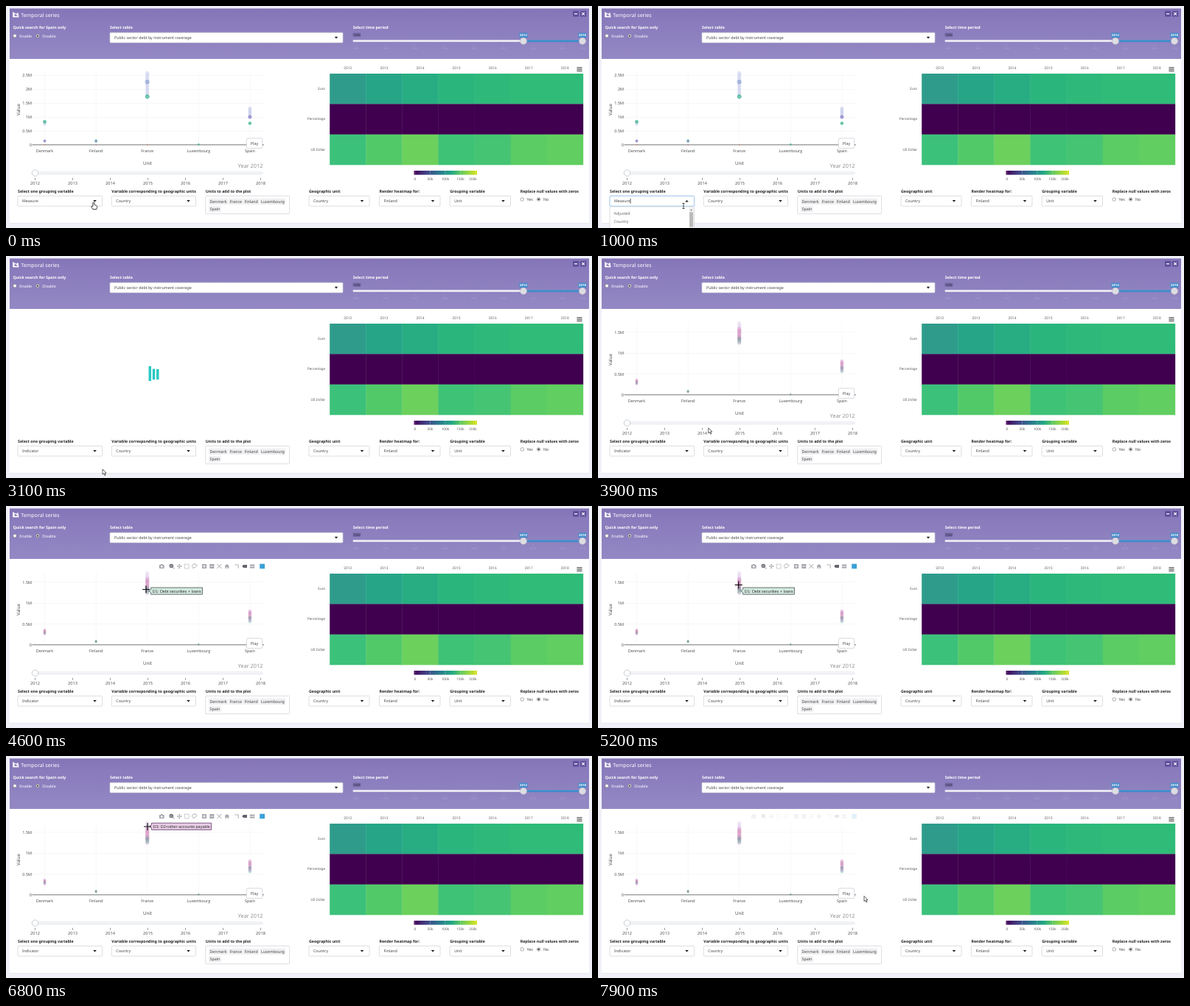
Write an HTML page with a canvas that moves like this. It is 795x302 px and loops after 8000 ms.

```html
<!DOCTYPE html>
<html lang="en">
<head>
<meta charset="utf-8">
<title>Temporal series</title>
<style>
  html, body { margin: 0; width: 100%; height: 100%; overflow: hidden; background: #f0f0f8; }
  canvas { display: block; }
</style>
</head>
<body>
<canvas id="stage" width="795" height="302"></canvas>
<script>
const ctx = document.getElementById('stage').getContext('2d');
const LOOP = 8000;
const UI = '"Noto Sans", sans-serif';
const PLOT = '"Open Sans", sans-serif';
const HEAT = 'Roboto, sans-serif';
const years = [2012, 2013, 2014, 2015, 2016, 2017, 2018];
const countries = ['Denmark', 'Finland', 'France', 'Luxembourg', 'Spain'];
const countryX = i => 52.5 + i * 69.6;

// y is the middle of the capitals
function text(s, x, y, { size = 5.3, color = '#444', font = UI, bold = false, align = 'left' } = {}) {
  ctx.font = `${bold ? 'bold ' : ''}${size}px ${font}`;
  ctx.textAlign = align;
  ctx.fillStyle = color;
  ctx.fillText(s, x, y + size * 0.36);
}
function rect(x, y, w, h, color) {
  ctx.fillStyle = color;
  ctx.fillRect(x, y, w, h);
}
function box(x, y, w, h, fill, stroke, r = 1, width = 0.7) {
  ctx.beginPath();
  ctx.roundRect(x, y, w, h, r);
  if (fill) { ctx.fillStyle = fill; ctx.fill(); }
  if (stroke) { ctx.strokeStyle = stroke; ctx.lineWidth = width; ctx.stroke(); }
}
function circle(x, y, r, fill, stroke, width = 0.7) {
  ctx.beginPath();
  ctx.arc(x, y, r, 0, 7);
  if (fill) { ctx.fillStyle = fill; ctx.fill(); }
  if (stroke) { ctx.strokeStyle = stroke; ctx.lineWidth = width; ctx.stroke(); }
}
function path(d, x, y, fill, stroke, width = 0.7) {
  const p = new Path2D(d);
  ctx.save();
  ctx.translate(x, y);
  if (fill) { ctx.fillStyle = fill; ctx.fill(p); }
  if (stroke) { ctx.strokeStyle = stroke; ctx.lineWidth = width; ctx.stroke(p); }
  ctx.restore();
}
const caret = (x, y, up) => path(up ? 'M-2.3 1.2H2.3L0-1.4Z' : 'M-2.3-1.2H2.3L0 1.4Z', x, y, '#222');

function select(x, w, label, value) {
  text(label, x, 252, { bold: true, color: '#222' });
  box(x, 258.4, w, 13.8, '#fff', '#ccd0d6');
  text(value, x + 6, 265.4);
  caret(x + w - 10, 265.3);
}
function radio(x, y, label, on, color) {
  circle(x, y, 2.3, '#fff', '#777', 0.6);
  if (on) circle(x, y, 1.2, '#333');
  text(label, x + 6.3, y, { color });
}

function drawHeader() {
  const g = ctx.createLinearGradient(0, 3, 0, 72);
  g.addColorStop(0, '#8474b7');
  g.addColorStop(0.25, '#897bbc');
  g.addColorStop(1, '#9488c4');
  rect(5, 3.4, 786, 68.6, g);
  path('M0 0V7H8M1.5 6V3.8L3.3 1.8 4.8 3.2 6.4 1.2 7.4 6Z', 9.6, 8, '#fff', '#fff', 0.7);
  text('Temporal series', 20.3, 12, { size: 7.05, color: '#fff' });
  for (const x of [769, 779]) box(x, 6.8, 8.2, 7.6, '#5e4f9b', null);
  rect(771, 10.1, 4.2, 1.2, '#fff');
  path('M-1.8-1.8 1.8 1.8M1.8-1.8-1.8 1.8', 783.1, 10.6, null, '#fff', 1.1);

  const title = { bold: true, color: '#fff' };
  text('Quick search for Spain only', 9.4, 29.5, title);
  radio(12, 40.6, 'Enable', false, '#fff');
  radio(43, 40.6, 'Disable', true, '#fff');
  text('Select table', 141, 29.5, title);
  box(141, 36.2, 316, 13.7, '#fff', '#ccd0d6');
  text('Public sector debt by instrument coverage', 147, 43.2);
  caret(448, 43);

  text('Select time period', 470.7, 29.5, title);
  box(470.6, 46.1, 316, 3, '#e6e4f0', null);
  rect(702, 46.1, 80, 3, '#428bca');
  box(470.6, 36.4, 10.6, 5.4, '#7166a0', null);
  text('1995', 475.9, 39.2, { size: 4.2, color: '#3f3a58', align: 'center' });
  for (const [x, year] of [[702, 2012], [782, 2018]]) {
    circle(x, 47.7, 4.6, '#dddde2', '#b5b3c2', 0.6);
    box(x - 5.6, 36.4, 11.2, 6.6, '#428bca', null);
    text(year, x, 39.8, { size: 4.3, color: '#fff', align: 'center', bold: true });
  }
  for (let i = 0; i < 9; i++) {
    const x = Math.min(474.5 + i * 40.1, 782);
    rect(x, 52, 0.5, 2.5, '#a79fcd');
    text(Math.min(1995 + 3 * i, 2018), x, 57.5, { size: 3.7, color: '#a9a1cf', align: 'center' });
  }
}

function drawHeatmap() {
  const rows = [
    ['Euro', ['#2f9c8b', '#26a587', '#27ad81', '#2ab57d', '#2eb97a', '#30bb78', '#30bb78']],
    ['Percentage', Array(7).fill('#40004f')],
    ['US Dollar', ['#3cc17b', '#52c969', '#6cd05c', '#3ec376', '#45c473', '#5bcc64', '#60ce60']]
  ];
  const w = 343.6 / 7, h = 124 / 3;
  rows.forEach(([name, colors], r) => {
    colors.forEach((c, i) => rect(439.2 + i * w, 92 + r * h, w + 0.4, h + 0.3, c));
    text(name, 433, 112.4 + r * h, { size: 4.8, font: HEAT, color: '#666', align: 'right' });
  });
  years.forEach((y, i) => text(y, 463.8 + i * w, 84.3, { size: 4.9, font: HEAT, color: '#666', align: 'center' }));
  for (let i = 0; i < 3; i++) rect(774.4, 83.2 + i * 2.3, 7.2, 1.2, '#555');

  const g = ctx.createLinearGradient(553.5, 0, 639, 0);
  ['#440154', '#414487', '#2a788e', '#22a884', '#7ad151', '#d8e219'].forEach((c, i) => g.addColorStop(i / 5, c));
  rect(553.5, 224, 85.5, 5.6, g);
  ['0', '50k', '100k', '150k', '200k'].forEach((s, i) => {
    const x = 554.2 + i * 20.5;
    rect(x + 0.5, 224, 0.5, 5.6, '#ffffff70');
    text(s, Math.min(x + 0.7, 633.5), 235.7, { size: 4.8, font: HEAT, color: '#666', align: 'center' });
  });
}

function drawControls(open, chosen) {
  select(16, 114.5, 'Select one grouping variable', chosen);
  select(143.3, 114.2, 'Variable corresponding to geographic units', 'Country');
  text('Units to add to the plot', 270.8, 252, { bold: true, color: '#222' });
  box(270.8, 258.4, 113.8, 24.4, '#fff', '#ccd0d6');
  [[276.5, 266], [303.5, 266], [323.5, 266], [346, 266], [276.5, 276.4]].forEach(([x, y], i) => {
    const name = ['Denmark', 'France', 'Finland', 'Luxembourg', 'Spain'][i];
    ctx.font = `5.3px ${UI}`;
    box(x - 1.5, y - 4.2, ctx.measureText(name).width + 3, 8.4, '#efeff1', null);
    text(name, x, y);
  });
  select(411, 82, 'Geographic unit', 'Country');
  select(506.4, 82.6, 'Render heatmap for:', 'Finland');
  select(602.2, 82.3, 'Grouping variable', 'Unit');
  text('Replace null values with zeros', 697.7, 252, { bold: true, color: '#222' });
  radio(700.2, 263, 'Yes', false);
  radio(722.6, 263, 'No', true);

  if (!open) return;
  box(16, 258.4, 114.5, 13.8, '#fff', '#7fb6ea');
  text('Measure', 22, 265.4);
  rect(43.7, 261.8, 0.7, 7, '#222');
  caret(120.5, 265.3, true);
  box(16, 273, 114.5, 40, '#fff', '#ccd0d6');
  ['Adjusted', 'Country', 'Frequency'].forEach((s, i) => text(s, 21.6, 282 + i * 11, { color: '#666' }));
  rect(123.6, 273.6, 6, 30, '#f0f0f0');
  path('M-1.4 1H1.4L0-.8Z', 126.6, 277.3, '#666');
  rect(124.2, 280.5, 4.9, 20, '#b9b9b9');
}

// A stack of translucent markers between two heights
function stack(x, top, bottom, n, r, colors) {
  for (let i = 0; i < n; i++) {
    const y = n > 1 ? top + (bottom - top) * i / (n - 1) : top;
    const c = colors[i % colors.length];
    circle(x, y, r, c + '48', c + '80', 0.5);
  }
}
function drawMeasurePoints() {
  const pale = ['#b5b4e2', '#a9c4ea', '#c5bfe6'];
  const [dk, fi, fr, lu, es] = countries.map((_, i) => countryX(i));
  const teal = '#2fae8a', violet = '#7b74c4';
  stack(fr, 91.5, 100, 4, 2.4, pale);
  stack(fr, 106, 120, 7, 2.2, pale);
  stack(fr, 103.2, 103.2, 2, 2.5, [violet, '#5b8cc9']);
  stack(fr, 123.2, 123.2, 3, 2.5, [teal]);
  stack(es, 139, 149, 7, 2, pale);
  stack(es, 151, 151, 3, 2.1, [violet]);
  stack(es, 159.6, 159.6, 3, 1.8, [teal]);
  stack(dk, 159, 161, 2, 1.8, pale);
  stack(dk, 157.4, 157.4, 3, 1.9, [teal]);
  stack(dk, 183.6, 183.6, 3, 1.5, [violet]);
  stack(fi, 183, 184.4, 4, 1.4, [teal, violet]);
  stack(lu, 188.3, 188.3, 2, 1.1, [teal]);
  for (const x of [dk, fi, fr, es]) circle(x, 188.7, 0.8, '#d8795f');
}
function drawIndicatorPoints() {
  const mix = ['#c77fd0', '#e08ab8', '#b26fb5', '#d87fa0'];
  const low = ['#55a895', '#8d7f9c'];
  const [dk, fi, fr, lu, es] = countries.map((_, i) => countryX(i));
  stack(fr, 91.5, 97, 3, 2.4, ['#dcc3e8']);
  stack(fr, 99, 113, 9, 2.4, mix);
  stack(fr, 112, 118, 4, 2.3, low);
  stack(es, 143, 152, 7, 2, mix);
  stack(es, 152, 157, 4, 1.9, low.concat(mix[0]));
  stack(dk, 168.5, 174, 7, 1.5, mix.concat(low));
  stack(fi, 183.5, 185, 4, 1.2, low);
  stack(lu, 188.3, 188.3, 2, 1, low);
}

function drawPlot(indicator) {
  const step = indicator ? 28.4 : 18.9;
  const ticks = indicator ? 3 : 5;
  for (let i = 0; i <= ticks; i++) {
    const y = 189 - i * step;
    if (i) rect(36, y - 0.2, 312, 0.5, '#eeeeee');
    text(i ? i / 2 + 'M' : '0', 35, y, { size: 5.5, font: PLOT, align: 'right' });
  }
  countries.forEach((name, i) => {
    rect(countryX(i) - 0.2, 90, 0.5, 98, '#f1f1f1');
    text(name, countryX(i), 197.3, { size: 5.4, font: PLOT, align: 'center' });
  });
  rect(35.5, 188.4, 314.5, 0.9, '#666');
  indicator ? drawIndicatorPoints() : drawMeasurePoints();

  ctx.save();
  ctx.translate(17, 141);
  ctx.rotate(-Math.PI / 2);
  text('Value', 0, 0, { size: 6.2, font: PLOT, align: 'center' });
  ctx.restore();
  text('Unit', 192, 213.7, { size: 6.2, font: PLOT, align: 'center' });
  text('Year 2012', 348.3, 217, { size: 7.3, font: PLOT, color: '#888', align: 'right' });

  box(326.3, 180, 21.4, 13.6, '#fff', '#c3c8d0', 1.8);
  text('Play', 337, 186.6, { size: 5.5, font: PLOT, align: 'center' });

  box(35.5, 225.9, 312.5, 2.6, '#fbfbfc', '#cfd4da', 1.3, 0.6);
  years.forEach((y, i) => {
    const x = 39.5 + i * 51;
    rect(x - 0.3, 233.8, 0.6, 3, '#555');
    text(y, x, 241.3, { size: 5.6, font: PLOT, align: 'center' });
  });
  circle(39.5, 227.2, 4.2, '#fff', '#b4bac2', 0.7);
}

function drawModebar(alpha) {
  ctx.save();
  ctx.globalAlpha = alpha;
  const grey = '#a4a6ab', dark = '#62656b';
  box(207.8, 80, 6.8, 5, grey, null);
  rect(210, 79, 2.4, 1.2, grey);
  circle(211.2, 82.5, 1.4, '#fff');
  circle(224.3, 81.6, 2.2, null, dark, 1.1);
  path('M0 0 2.2 2.2M-3.2-1.7H-.2M-1.7-3.2V-.2', 226, 83.3, null, dark, 0.9);
  path('M-3 0H3M0-3V3M-1-2 0-3 1-2M-1 2 0 3 1 2M-2-1-3 0-2 1M2-1 3 0 2 1', 235.2, 82, null, grey, 0.9);
  ctx.setLineDash([1.2, 0.8]);
  ctx.strokeStyle = grey;
  ctx.lineWidth = 0.9;
  ctx.strokeRect(242.3, 79.2, 5.8, 5.8);
  ctx.setLineDash([]);
  path('M-2 1.5C-5-1-1-4 2-2.8 5-1.5 2 2-1 1.5M-2 1.5-1 3.5', 255.6, 82, null, grey, 0.9);
  for (const x of [269, 279.3]) {
    rect(x - 3, 79, 6, 6, grey);
    rect(x - 2, 81.6, 4, 0.9, '#fff');
  }
  rect(268.5, 80, 0.9, 4, '#fff');
  path('M-3-3 3 3M3-3-3 3', 289.4, 82, null, grey, 1);
  path('M-3.4 0 0-3 3.4 0H2.4V3H.7V1H-.7V3H-2.4V0Z', 299.8, 82, grey);
  path('M-2.8-2H2V3', 313.2, 82, null, grey, 0.9);
  path('M-3.4 0-1.5-2H3.4V2H-1.5Z', 323.6, 82, dark);
  for (const y of [79.6, 82.6]) rect(330.8, y, 6.6, 2, grey);
  rect(344.2, 78.7, 6.8, 6.6, '#3aa0d6');
  ctx.restore();
}

function drawHover(x, y, label, fill, stroke) {
  ctx.font = '5.5px "Liberation Sans", sans-serif';
  const w = ctx.measureText(label).width + 4;
  path(`M-3 0 0-2V-4.6H${w}V4.6H0V2Z`, x, y, fill, stroke, 0.8);
  text(label, x + 2.2, y, { size: 5.5, font: '"Liberation Sans", sans-serif', color: '#333' });
}

// Three bars that grow in turn
function drawLoader(t) {
  const em = 3.5;
  [0.32, 0.16, 0].forEach((lead, i) => {
    const phase = ((t - 2000) / 1220 + lead + 1) % 1;
    const u = Math.max(0, 1 - Math.abs(phase - 0.4) / 0.4);
    const grow = u * u * (3 - 2 * u);
    rect(193.5 + i * 1.5 * em, 154 - 2 * em * grow, em, 4 * em + 3 * em * grow, '#2bc8c4');
  });
}

const cursors = {
  hand: (x, y) => path('M-1 0Q0-1 1 0V3L4 4Q5 4.3 4.8 6L4 9H-1L-3.2 5.5Q-3-4-1 5.2Z'.replace('-3-4', '-3 4'), x, y, '#fff', '#111', 0.8),
  beam: (x, y) => path('M-1.5-3.5H1.5M-1.5 3.5H1.5M0-3.5V3.5', x, y, null, '#222', 0.8),
  arrow: (x, y) => path('M0 0V7.2L1.7 5.7 2.9 8.5 4.1 8 2.9 5.2H5Z', x, y, '#fff', '#222', 0.7),
  cross: (x, y) => path('M-5 0H5M0-5V5', x, y, null, '#111', 1.2)
};
const track = [
  [0, 118.8, 267.5], [600, 118.8, 267.5], [800, 116, 272], [1150, 116, 272], [1400, 105, 310],
  [2500, 110, 310], [2900, 131, 290], [3600, 131, 290], [4400, 190, 113.5], [5000, 190, 113.5],
  [5500, 192, 96], [7520, 192, 96], [7820, 361, 190.5], [LOOP, 361, 190.5]
];
function pointer(t) {
  const i = track.findIndex(k => k[0] > t);
  const [t0, x0, y0] = track[i - 1], [t1, x1, y1] = track[i];
  const u = (t - t0) / (t1 - t0), e = u * u * (3 - 2 * u);
  return [x0 + (x1 - x0) * e, y0 + (y1 - y0) * e];
}
const clamp = v => Math.max(0, Math.min(1, v));

function draw(t) {
  const loading = t >= 1600 && t < 3250;
  const [px, py] = pointer(t);
  rect(0, 0, 795, 302, '#f0f0f8');
  rect(5, 72, 786, 223.5, '#fff');
  rect(5, 295.3, 786, 0.6, '#dedee8');
  drawHeader();
  drawHeatmap();
  loading ? drawLoader(t) : drawPlot(t >= 3250);
  drawControls(t >= 700 && t < 1600, t < 1600 ? 'Measure' : 'Indicator');

  const bar = clamp((t - 3900) / 300) * clamp((7940 - t) / 260);
  if (bar > 0) drawModebar(bar);
  if (t >= 4350 && t < 5250) drawHover(196.6, 115.6, 'D1: Debt securities + loans', '#d3e9df', '#47544e');
  if (t >= 5250 && t < 7560) drawHover(197.4, 95.8, 'D3: D2+other accounts payable', '#e8cce6', '#5d3a66');

  const inPlot = t >= 4100 && t < 7640;
  const kind = t < 700 ? 'hand' : t < 1250 ? 'beam' : inPlot ? 'cross' : 'arrow';
  cursors[kind](px, py);
}

ctx.textRendering = 'geometricPrecision';
function frame(now) {
  draw(now % LOOP);
  requestAnimationFrame(frame);
}
requestAnimationFrame(frame);
</script>
</body>
</html>
```
